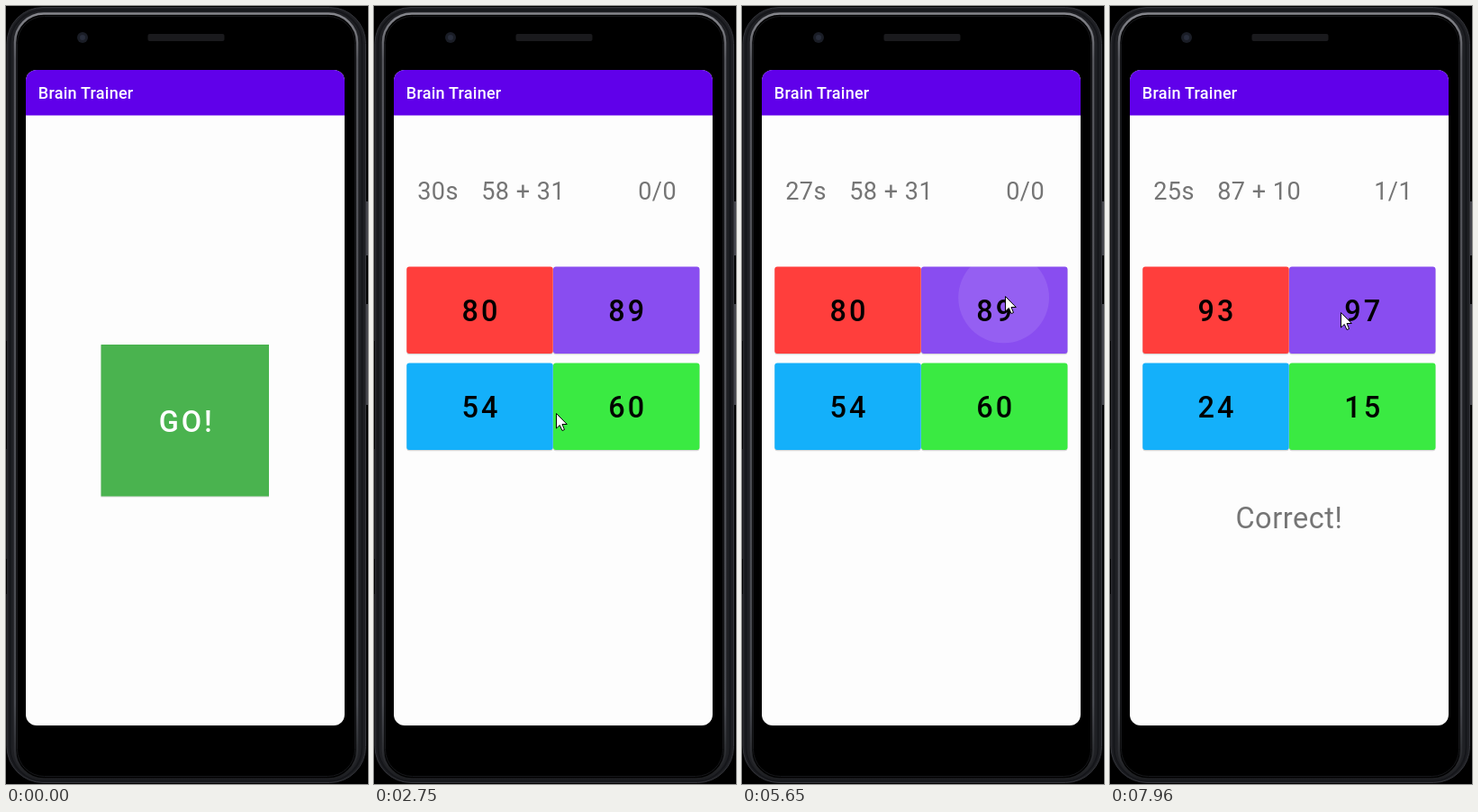
An HTML page that plays this animation: 402 by 864 pixels, repeating every 8 s.

```html
<!DOCTYPE html>
<html lang="en">
<head>
<meta charset="utf-8">
<title>Brain Trainer</title>
<style>
  html, body { margin: 0; width: 100%; height: 100%; overflow: hidden; background: #000; }
  svg { display: block; width: 100%; height: 100%; font-family: Roboto, sans-serif; }
  .title { fill: #fff; font-size: 18.03px; font-weight: 500; letter-spacing: .0125em; }
  .label { fill: #757575; font-size: 27.05px; letter-spacing: .0178em; }
  #verdict { font-size: 32.45px; }
  .answer { font-size: 32.45px; font-weight: 500; letter-spacing: .0893em; text-anchor: middle; }
</style>
</head>
<body>
<svg viewBox="0 0 402 864">
  <defs>
    <linearGradient id="rim" x2="0" y2="1">
      <stop offset="0" stop-color="#85868c"/>
      <stop offset=".06" stop-color="#54555b"/>
      <stop offset=".9" stop-color="#484a50"/>
      <stop offset="1" stop-color="#1c1d20"/>
    </linearGradient>
    <clipPath id="screen"><rect x="22" y="71" width="354" height="728" rx="12"/></clipPath>
    <clipPath id="goArea"><rect x="105.5" y="376" width="186.5" height="168.5"/></clipPath>
    <clipPath id="answerArea"><rect x="199" y="289.5" width="162.5" height="96.5" rx="3"/></clipPath>
  </defs>

  <g id="phone" fill="none">
    <rect width="402" height="864" fill="#000"/>
    <rect x="1" y="1.5" width="398.5" height="861" rx="40" fill="#1f2024" stroke="#34353b"/>
    <rect x="4.5" y="4.5" width="391" height="856" rx="37" stroke="#15161a" stroke-width="2"/>
    <rect x="10" y="8.5" width="380" height="850" rx="32" fill="#000" stroke="url(#rim)" stroke-width="2.5"/>
    <rect x="12.5" y="11.5" width="375" height="844" rx="30" stroke="#17181b"/>
    <path d="M401 217v60M401 331v112" stroke="#45464c" stroke-width="2"/>
    <path d="M.5 372v120M.5 614v39" stroke="#000"/>
    <circle cx="85" cy="35" r="6" fill="#1a1d26"/>
    <circle cx="85" cy="35" r="3" fill="#282d3b"/>
    <rect x="157.5" y="31" width="85" height="8" rx="2" fill="#1a1a1d"/>
  </g>

  <g clip-path="url(#screen)">
    <rect x="22" y="71" width="354" height="728" fill="#fdfdfd"/>
    <rect x="22" y="71" width="354" height="50.5" fill="#6000ea"/>
    <text class="title" x="35.8" y="103">Brain Trainer</text>

    <g id="start">
      <rect x="105.5" y="377" width="186.5" height="168.5" fill="#dcdcdc"/>
      <rect x="105.5" y="376" width="186.5" height="168.5" fill="#4ab34f"/>
      <circle id="goRipple" clip-path="url(#goArea)" fill="#fff"/>
      <text class="answer" x="200.6" y="473" fill="#fff">GO!</text>
    </g>

    <g id="game">
      <text class="label" id="timer" x="48.2" y="215"/>
      <text class="label" id="sum" x="119.2" y="215"/>
      <text class="label" id="score" x="293.2" y="215"/>
      <g id="answers"></g>
      <text class="label" id="verdict" x="139.4" y="580">Correct!</text>
    </g>
  </g>

  <path id="cursor" d="M0 0V16.5L3.8 13L6.5 19L9 18L6.5 12H11.8Z" fill="#fff" stroke="#000" stroke-linejoin="round"/>
</svg>

<script>
const LOOP = 8000;
const GAME_START = 2370;
const ANSWERED = 5720;
const byId = id => document.getElementById(id);

const rounds = [
  { sum: '58 + 31', score: '0/0', answers: [80, 89, 54, 60] },
  { sum: '87 + 10', score: '1/1', answers: [93, 97, 24, 15] },
];

// Cursor stops: time, x, y
const stops = [
  [900, 400, 866], [1170, 330, 760], [1420, 230, 584], [1900, 201, 472],
  [2250, 203, 455], [2750, 202, 452], [3300, 178, 400], [3700, 146, 346],
  [4080, 141, 342], [4500, 138, 345], [5100, 284, 326], [5650, 292, 322],
  [5900, 290, 326], [6500, 273, 424], [6950, 272, 458], [7350, 272, 484],
  [7840, 264, 434], [7960, 256, 340],
];

byId('answers').innerHTML = ['#ff3e3c', '#894df0', '#14b0fa', '#3aea42'].map((color, i) => {
  const x = i % 2 ? 199 : 36.25;
  const y = i < 2 ? 289.5 : 396.5;
  const box = `x="${x}" width="162.5" height="96.5" rx="3"`;
  const ripple = i === 1 ? '<circle id="answerRipple" clip-path="url(#answerArea)" fill="#fff"/>' : '';
  return `<rect ${box} y="${y + 1.3}" fill="#d8d8d8"/><rect ${box} y="${y}" fill="${color}"/>${ripple}
    <text class="answer" x="${x + 82.7}" y="${y + 60.5}"></text>`;
}).join('');
const answerTexts = document.querySelectorAll('#answers text');

const clamp01 = v => Math.min(1, Math.max(0, v));
const mix = (a, b, p) => a + (b - a) * p;
const show = (id, visible) => byId(id).setAttribute('visibility', visible ? 'inherit' : 'hidden');

function setAttributes(id, attributes) {
  for (const name in attributes) byId(id).setAttribute(name, attributes[name]);
}

function drawRipple(id, t, press, release, from, to, radius) {
  const grow = clamp01((t - press) / 225);
  const fade = 1 - clamp01((t - release) / 280);
  setAttributes(id, {
    cx: mix(from[0], to[0], grow * grow),
    cy: mix(from[1], to[1], grow * grow),
    r: mix(radius * .3, radius, grow),
    opacity: t < press ? 0 : .1 * fade,
  });
}

function drawCursor(t) {
  show('cursor', t >= stops[0][0]);
  const next = stops.findIndex(stop => stop[0] > t);
  if (next === 0) return;
  const b = stops.at(next);
  const a = next < 0 ? b : stops[next - 1];
  const p = a === b ? 1 : (t - a[0]) / (b[0] - a[0]);
  const eased = p * p * (3 - 2 * p);
  const x = Math.round(mix(a[1], b[1], eased)) + .5;
  const y = Math.round(mix(a[2], b[2], eased)) + .5;
  setAttributes('cursor', { transform: `translate(${x} ${y})` });
}

function draw(t) {
  const playing = t >= GAME_START;
  const answered = t >= ANSWERED;
  const round = rounds[answered ? 1 : 0];
  show('start', !playing);
  show('game', playing);
  show('verdict', playing && answered);

  byId('timer').textContent = 30 - Math.max(0, Math.floor((t - GAME_START) / 1000)) + 's';
  byId('sum').textContent = round.sum;
  byId('score').textContent = round.score;
  answerTexts.forEach((text, i) => { text.textContent = round.answers[i]; });

  drawRipple('goRipple', t, 2250, GAME_START, [203, 455], [198.7, 460], 126);
  drawRipple('answerRipple', t, 5575, ANSWERED, [292, 322], [280, 338], 94);
  drawCursor(t);
}

function frame() {
  draw(performance.now() % LOOP);
  requestAnimationFrame(frame);
}
frame();
</script>
</body>
</html>
```
